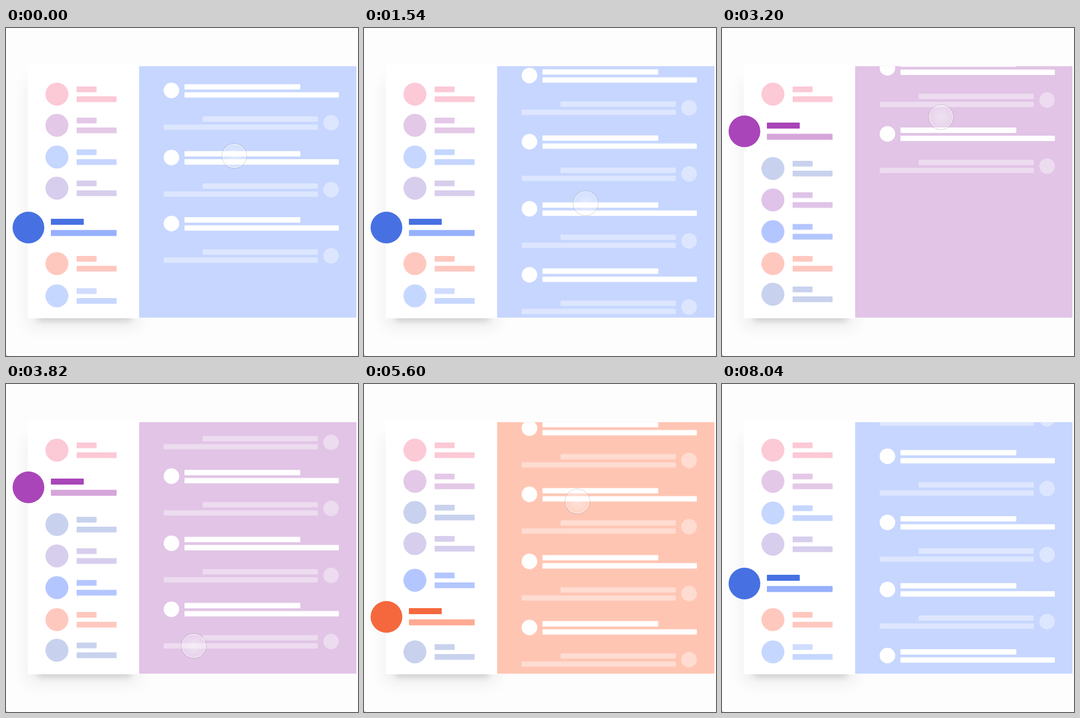
An HTML page without scripts for the animation above (8060 ms loop, 643 by 600 pixels).

```html
<!DOCTYPE html>
<html lang="en">
<head>
<meta charset="utf-8">
<title>Chat list</title>
<style>
@property --s { syntax: '<number>'; inherits: true; initial-value: 0; }
html, body { margin: 0; width: 100%; height: 100%; overflow: hidden; background: #fdfdfd; }
svg { display: block; width: 643px; height: 600px; }

/* --a, --b, --c: row height; --ca, --cb, --cc: colour, for each of the three chats */
.item, .item *, .panel, .list, .cursor { animation: 8060ms infinite both; }
.item { animation-timing-function: ease-out; transform: translateY(var(--a)); }
.item circle { cx: calc(93px - 52px * var(--s)); r: calc(21px + 8px * var(--s)); }
.item rect { x: calc(129px - 47px * var(--s)); height: calc(10.5px + .5px * var(--s)); rx: 1px; }
.name { y: calc(-14px - 2px * var(--s)); width: calc(36.5px + 23.5px * var(--s)); }
.text { y: calc(4px + .5px * var(--s)); width: calc(73px + 47px * var(--s)); }
.item *, .panel { fill: var(--ca); animation-name: tint; animation-timing-function: linear; }

#i1 { --a: 121px; --b: 121px; --c: 121px; --ca: #fcc9d6; --cb: #fcc9d6; --cc: #fcc9d6; }
#i2 { --a: 178px; --b: 189px; --c: 178px; --ca: #e4c8e8; --cb: #a945b9; --cc: #e4c8e8; animation-name: slow, pick2; }
#i2 .text { --cb: #d6a5da; }
#i3 { --a: 236px; --b: 257px; --c: 235px; --ca: #c5d6ff; --cb: #c8d2ee; --cc: #c8d2ee; animation-name: quick; }
#i4 { --a: 293px; --b: 314.5px; --c: 292px; --ca: #d7ceed; animation-name: quick; }
#i4 * { animation-name: blush; }
#i5 { --a: 365px; --b: 372.5px; --c: 359px; --ca: #4771e2; --cb: #b4c6ff; --cc: #b4c6ff; animation-name: slow, pick5; }
#i5 .text { --ca: #97b0fd; }
#i6 { --a: 431px; --b: 431px; --c: 426px; --ca: #ffc8bf; --cb: #ffc8bf; --cc: #f5683e; animation-name: slow, pick6; }
#i6 .text { --cc: #ffaa92; }
#i7 { --a: 490px; --b: 487px; --c: 490px; --ca: #c6d7ff; --cb: #c8d2ee; --cc: #c8d2ee; animation-name: quick; }
#i7 .name { --ca: #d0dcff; }
.panel { --ca: #c6d6ff; --cb: #e1c4e6; --cc: #ffc5b3; }

@keyframes tint {
  0%, 31.017% { fill: var(--ca); }
  32.258%, 58.065% { fill: var(--cb); }
  59.305%, 81.886% { fill: var(--cc); }
  83.127%, 100% { fill: var(--ca); }
}
@keyframes blush {
  0%, 31.017% { fill: #d7ceed; }
  32.258%, 42% { fill: #e0c3e8; }
  43%, 100% { fill: #d7ceed; }
}
@keyframes slow {
  0%, 31.886% { transform: translateY(var(--a)); }
  34.119%, 58.933% { transform: translateY(var(--b)); }
  61.166%, 82.754% { transform: translateY(var(--c)); }
  84.988%, 100% { transform: translateY(var(--a)); }
}
@keyframes quick {
  0%, 31.017% { transform: translateY(var(--a)); }
  32.506%, 58.065% { transform: translateY(var(--b)); }
  59.553%, 81.886% { transform: translateY(var(--c)); }
  83.375%, 100% { transform: translateY(var(--a)); }
}
@keyframes pick2 {
  0%, 31.886% { --s: 0; }
  34.119%, 58.933% { --s: 1; }
  61.166%, 100% { --s: 0; }
}
@keyframes pick5 {
  0%, 31.886% { --s: 1; }
  34.119%, 82.754% { --s: 0; }
  84.988%, 100% { --s: 1; }
}
@keyframes pick6 {
  0%, 58.933% { --s: 0; }
  61.166%, 82.754% { --s: 1; }
  84.988%, 100% { --s: 0; }
}

.list { animation-name: scroll; animation-timing-function: ease-in-out; }
@keyframes scroll {
  0% { transform: translateY(0); }
  12.5% { transform: translateY(148px); animation-timing-function: ease-in; }
  19.107% { transform: translateY(94px); animation-timing-function: linear; }
  20.6% { transform: translateY(58px); animation-timing-function: ease-out; }
  27%, 35.5% { transform: translateY(0); }
  39.702% { transform: translateY(-164px); }
  40.3% { transform: translateY(-166px); animation-timing-function: ease-in; }
  47.395% { transform: translateY(54px); animation-timing-function: ease-out; }
  56%, 65% { transform: translateY(211px); }
  70% { transform: translateY(85px); }
  77.916% { transform: translateY(140px); }
  100% { transform: translateY(139px); }
}

.cursor { animation-name: point; animation-timing-function: ease-in-out; }
@keyframes point {
  0% { transform: translate(417px, 234px); }
  12% { transform: translate(402px, 378px); animation-timing-function: ease-in; }
  19.107% { transform: translate(405px, 321px); animation-timing-function: ease-out; }
  22% { transform: translate(385px, 250px); }
  30%, 32.5% { transform: translate(70px, 182px); }
  36% { transform: translate(390px, 290px); }
  39.702% { transform: translate(400px, 163px); }
  47.395% { transform: translate(343px, 479px); }
  50% { transform: translate(330px, 482px); }
  57.5%, 60.5% { transform: translate(97px, 437px); }
  65% { transform: translate(400px, 340px); }
  69.5% { transform: translate(390px, 215px); }
  73% { transform: translate(375px, 300px); }
  77.916% { transform: translate(141px, 352px); animation-timing-function: ease-out; }
  80%, 84% { transform: translate(95px, 359px); }
  96%, 100% { transform: translate(672px, 480px); }
}
</style>
</head>
<body>
<svg viewBox="0 0 643 600">
  <defs>
    <clipPath id="view"><rect x="243" y="70" width="397" height="460"/></clipPath>
    <radialGradient id="glass">
      <stop offset="0" stop-color="#fff" stop-opacity=".5"/>
      <stop offset="1" stop-color="#fff" stop-opacity=".25"/>
    </radialGradient>
    <g id="pair" fill="#fff">
      <circle cx="302.2" r="14.2"/>
      <rect x="326" y="-11.6" width="211.5" height="9.8" rx="1"/>
      <rect x="326" y="3.2" width="282" height="9.8" rx="1"/>
      <g opacity=".4" transform="translate(0 58.9)">
        <circle cx="593.8" r="14.2"/>
        <rect x="359" y="-11.6" width="210.5" height="9.8" rx="1"/>
        <rect x="288" y="3.2" width="281.5" height="9.8" rx="1"/>
      </g>
    </g>
  </defs>

  <path d="M0 595Q0 600 5 600H0Z" fill="#c4c4c4"/>
  <rect x="37" y="95" width="208" height="454" rx="10" opacity=".055" style="filter:blur(14px)"/>
  <rect x="58" y="500" width="170" height="36" opacity=".14" style="filter:blur(6px)"/>
  <rect x="39.5" y="68" width="204" height="463" fill="#fff"/>
  <rect class="panel" x="243.2" y="69.8" width="396.8" height="460"/>

  <g clip-path="url(#view)">
    <g class="list">
      <use href="#pair" y="-377"/>
      <use href="#pair" y="-256"/>
      <use href="#pair" y="-134.3"/>
      <use href="#pair" y="-6.7"/>
      <use href="#pair" y="114.3"/>
      <use href="#pair" y="236.9"/>
      <use href="#pair" y="357.7"/>
    </g>
  </g>

  <g class="item" id="i1"><circle/><rect class="name"/><rect class="text"/></g>
  <g class="item" id="i2"><circle/><rect class="name"/><rect class="text"/></g>
  <g class="item" id="i3"><circle/><rect class="name"/><rect class="text"/></g>
  <g class="item" id="i4"><circle/><rect class="name"/><rect class="text"/></g>
  <g class="item" id="i5"><circle/><rect class="name"/><rect class="text"/></g>
  <g class="item" id="i6"><circle/><rect class="name"/><rect class="text"/></g>
  <g class="item" id="i7"><circle/><rect class="name"/><rect class="text"/></g>

  <g class="cursor">
    <circle r="22.6" fill="none" stroke="#777" stroke-opacity=".25" stroke-width="1.4"/>
    <circle r="21.5" fill="url(#glass)" stroke="#fff" stroke-opacity=".6" stroke-width="1.5"/>
  </g>
</svg>
</body>
</html>
```
